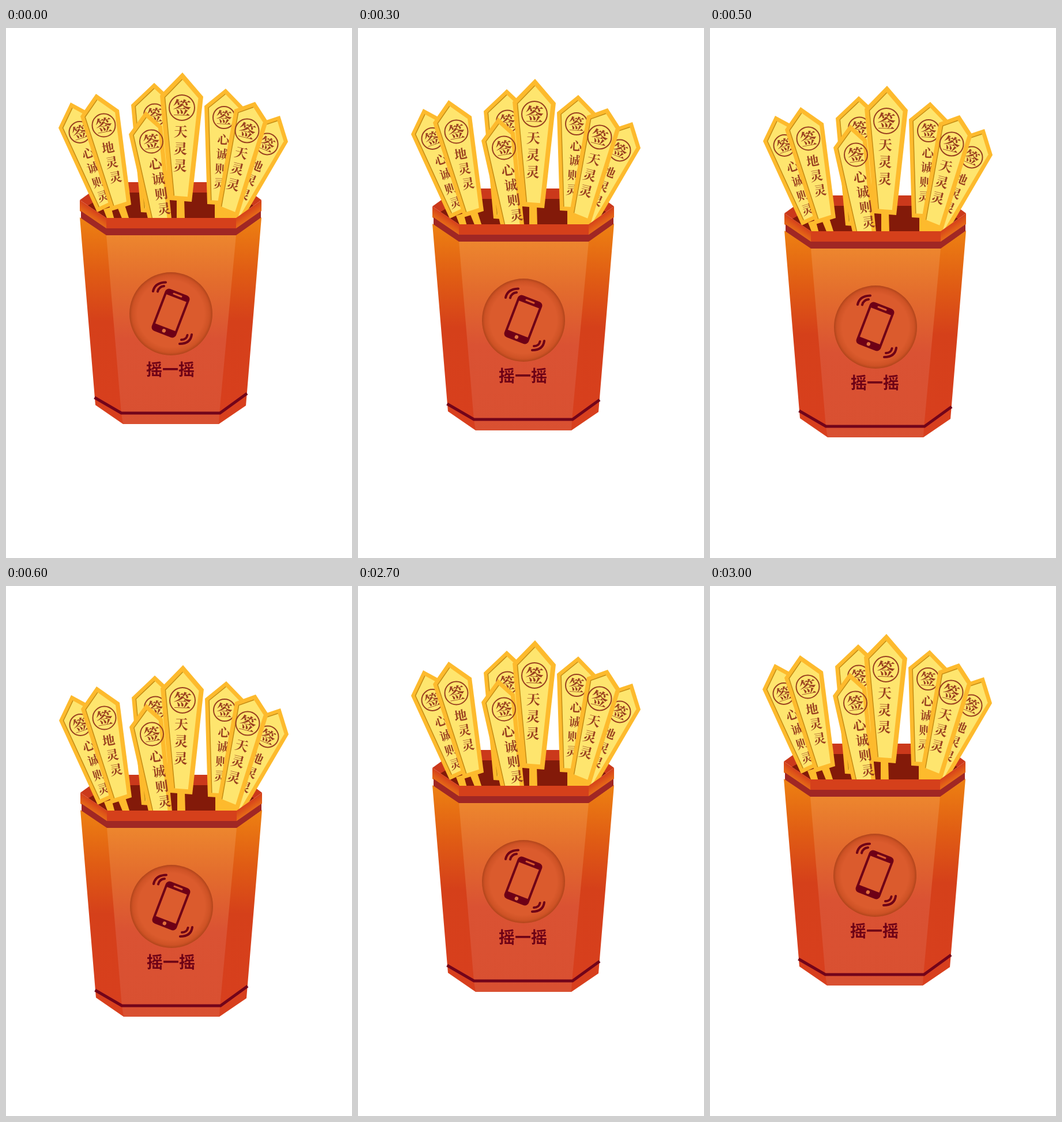
These frames come from a looping animation (600 px wide and 918 px high, 3.1 s). An HTML page:

```html
<!DOCTYPE html>
<html lang="zh-CN">
<head>
<meta charset="utf-8">
<title>摇一摇</title>
<style>
html, body { margin: 0; width: 100%; height: 100%; overflow: hidden; background: #fff; }
svg { display: block; width: 100vw; height: 100vh; }
text { text-anchor: middle; }
.stick text { font-family: "Noto Serif CJK SC", "Noto Sans CJK SC", "Noto Sans CJK", serif; font-weight: 700; fill: #994020; }
.title { font: 900 28px "Noto Sans CJK SC", "Noto Sans CJK", sans-serif; fill: #6e0016; }
</style>
</head>
<body>
<svg viewBox="0 0 600 918">
  <defs>
    <linearGradient id="side" gradientUnits="userSpaceOnUse" x1="0" y1="390" x2="0" y2="746">
      <stop offset="0" stop-color="#ed8012"/>
      <stop offset=".26" stop-color="#e05c14"/>
      <stop offset=".5" stop-color="#d5401a"/>
      <stop offset="1" stop-color="#d83f1e"/>
    </linearGradient>
    <linearGradient id="front" gradientUnits="userSpaceOnUse" x1="0" y1="419" x2="0" y2="746">
      <stop offset="0" stop-color="#ed862e"/>
      <stop offset=".25" stop-color="#e36c2d"/>
      <stop offset=".55" stop-color="#da5233"/>
      <stop offset="1" stop-color="#d95031"/>
    </linearGradient>
    <linearGradient id="rimL" gradientUnits="userSpaceOnUse" x1="148" y1="371" x2="140" y2="383">
      <stop offset="0" stop-color="#d5401b"/><stop offset="1" stop-color="#e66a17"/>
    </linearGradient>
    <linearGradient id="rimR" gradientUnits="userSpaceOnUse" x1="426" y1="371" x2="434" y2="383">
      <stop offset="0" stop-color="#d5401b"/><stop offset="1" stop-color="#e66a17"/>
    </linearGradient>
    <radialGradient id="dish">
      <stop offset=".8" stop-color="#db5b2d"/>
      <stop offset=".93" stop-color="#ce5225"/>
      <stop offset="1" stop-color="#b1451b"/>
    </radialGradient>
  </defs>
  <g id="cup">
    <path fill="#cb391b" d="M129 358L172 327H402L444 358L400 389H175Z"/>
    <path fill="#831a09" d="M143 367.5L181 345H392L430 367.5L400 389H175Z"/>
    <g id="sticks"></g>

    <path fill="url(#rimL)" d="M129 358L175 389V408L129 377Z"/>
    <path fill="url(#rimR)" d="M444 358L400 389V408L444 377Z"/>
    <path fill="#d5401b" d="M175 389H400V408H175Z"/>
    <path fill="#a02724" d="M131 377L175 407H400L443 377V389L400 420H175L131 390Z"/>

    <path fill="url(#side)" d="M129 388L175 419H400L444 388L417 714L370 746H204L156 713Z"/>
    <path fill="url(#front)" d="M175 419H400L371 728L370 746H204L201 728Z"/>
    <path fill="none" stroke="#72041a" stroke-width="5" d="M154.500 700L201 727H372L419 693"/>

    <circle cx="287" cy="555" r="72" fill="url(#dish)"/>
    <g transform="translate(286.500 554) rotate(21)">
      <rect x="-22.500" y="-39" width="45" height="78" rx="7" fill="#6e0016"/>
      <rect x="-18.500" y="-28" width="37" height="54" fill="#dc5c2e"/>
      <rect x="-8.500" y="-35" width="17" height="3" rx="1.500" fill="#dc5c2e"/>
      <circle cy="32.500" r="3.200" fill="#e0703c"/>
    </g>
    <path fill="none" stroke="#6e0016" stroke-width="4" stroke-linecap="round"
      d="M256 516Q259 501 278 500.500M264 516.500Q266 508 275 507M302 607Q321 607 323 591M305 600Q314 600 315.500 592"/>
    <text class="title" x="286" y="662">摇一摇</text>
  </g>
</svg>
<script>
const NS = 'http://www.w3.org/2000/svg';
const cup = document.getElementById('cup');
const sticks = document.getElementById('sticks');

function add(parent, tag, attrs, label) {
  const el = document.createElementNS(NS, tag);
  for (const k in attrs) el.setAttribute(k, attrs[k]);
  if (label) el.textContent = label;
  parent.appendChild(el);
  return el;
}

const pairs = s => s.split(' ').map(p => p.split(',').map(Number));

// Moves every edge of a clockwise polygon inwards by d.
function inset(pts, d) {
  const n = pts.length;
  const edges = pts.map((p, i) => {
    const q = pts[(i + 1) % n], dx = q[0] - p[0], dy = q[1] - p[1], len = Math.hypot(dx, dy);
    return { x: p[0] - dy / len * d, y: p[1] + dx / len * d, dx, dy };
  });
  return edges.map((b, i) => {
    const a = edges[(i + n - 1) % n];
    const t = ((b.x - a.x) * b.dy - (b.y - a.y) * b.dx) / (a.dx * b.dy - a.dy * b.dx);
    return [a.x + a.dx * t, a.y + a.dy * t];
  });
}

function glyph(g, ch, x, y, size, rot) {
  add(g, 'text', { y: size * 0.38, 'font-size': size, transform: `translate(${x} ${y}) rotate(${rot})` }, ch);
}

// head: tip, right shoulder, right foot, left foot, left shoulder
function stick({ head, handle, seal, r, words = '', from, to, size, rot }) {
  const g = add(sticks, 'g', { class: 'stick' });
  const outer = pairs(head), face = inset(outer, r * 0.37);
  if (handle) add(g, 'polygon', { points: handle, fill: '#fdbb2c' });
  add(g, 'polygon', { points: outer.join(' '), fill: '#fdba2d' });
  add(g, 'polygon', { points: face.join(' '), fill: '#fee56e' });
  add(g, 'polyline', { points: [face[3], face[4], face[0]].join(' '), fill: 'none', stroke: '#c58c14', 'stroke-width': 1.5 });
  add(g, 'circle', { cx: seal[0], cy: seal[1], r, fill: 'none', stroke: '#994020', 'stroke-width': 2 });
  glyph(g, '签', ...seal, r * 1.42, rot);
  [...words].forEach((ch, i) => {
    const k = i / (words.length - 1);
    glyph(g, ch, from[0] + (to[0] - from[0]) * k, from[1] + (to[1] - from[1]) * k, size, rot);
  });
}

[
  { head: '113,189 150,209 196,362 159,379 92,233', handle: '170,374 183,370 189,392 177,392',
    seal: [129, 240.5], r: 18.5, words: '心诚则灵', from: [143, 277], to: [169, 351], size: 21, rot: -18 },
  { head: '157,174 197,202 218,366 183,377 130,213', handle: '194,370 207,367 215,392 203,392',
    seal: [170.5, 228.5], r: 20, words: '地灵灵', from: [178, 267], to: [191, 318], size: 22, rot: -10 },
  { head: '258,155 291,186 284,382 235,379 218,193',
    seal: [259, 210.5], r: 19, rot: -4 },
  { head: '307,137 343,179 323,361 285,358 268,177', handle: '297,355 310,355 311,392 297,392',
    seal: [306, 198], r: 22, words: '天灵灵', from: [304, 239], to: [303, 298], size: 24, rot: 2 },
  { head: '243,204 272,230 290,410 252,412 214,244',
    seal: [253, 256.5], r: 20, words: '心诚则灵', from: [260, 295], to: [275, 373], size: 23, rot: -8 },
  { head: '382,165 412,196 400,368 350,365 345,195', handle: '363,360 405,360 405,392 363,392',
    seal: [379, 215], r: 19, words: '心诚则灵', from: [378, 253], to: [371, 329], size: 21, rot: 3 },
  { head: '476,212 490,257 408,397 372,382 446,222',
    seal: [454, 261], r: 18.5, words: '地灵灵', from: [436, 298], to: [414, 347], size: 21, rot: 22 },
  { head: '433,188 455,222 403,389 366,374 397,201',
    seal: [419, 238], r: 20.5, words: '天灵灵', from: [409, 276], to: [395, 331], size: 23, rot: 14 }
].forEach(stick);

const LOOP = 3100, STEP = 100;
const lift = [60, 54, 52, 49, 43, 37, 0];

function draw(now) {
  const i = Math.floor((now % LOOP) / STEP);
  // the way up mirrors the way down
  const k = Math.min(i, LOOP / STEP - i, 6);
  cup.setAttribute('transform', `translate(${k < 2 ? -1 : 0} ${-lift[k]})`);
}

const start = performance.now();
function tick() {
  draw(performance.now() - start);
  requestAnimationFrame(tick);
}
tick();
</script>
</body>
</html>
```
